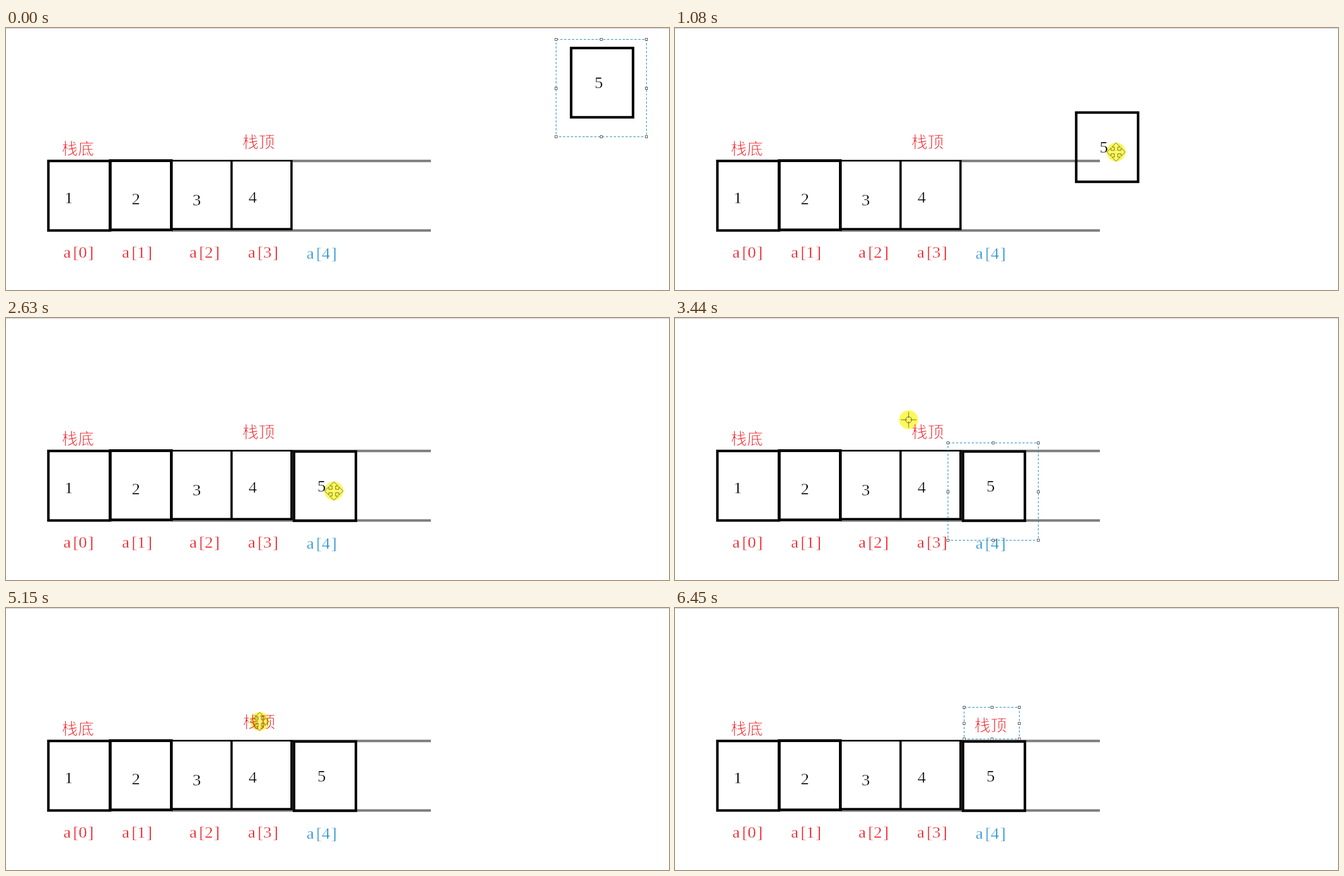
These frames come from a looping animation (1189x471 px, 7.12 s). An HTML page:

```html
<!DOCTYPE html>
<html lang="zh">
<head>
<meta charset="utf-8">
<title>Stack push</title>
<style>
html, body { margin: 0; width: 100%; height: 100%; overflow: hidden; background: #fff; }
svg { display: block; }
/* The white outline thins the letters. */
text { stroke: #fff; stroke-width: .45; }
.serif { font: 30px "Liberation Serif", "Noto Serif", serif; }
.cjk { font: 100 29px "Noto Sans CJK SC", "Noto Sans CJK", sans-serif; stroke-width: .9; }
.red { fill: #ed1c24; }
.blue { fill: #2c93d2; }
.ink { fill: none; stroke: #000; }
.dashed { fill: none; stroke: #000; stroke-dasharray: 4 3; shape-rendering: crispEdges; }
.select { stroke: #1a86cc; }
.handle { fill: #fff; stroke: #555; shape-rendering: crispEdges; }
.pointer { fill: none; stroke: #66662c; stroke-width: 1; }
.halo { fill: #fcf85c; mix-blend-mode: multiply; }
</style>
</head>
<body>
<svg width="1189" height="471" viewBox="0 0 1189 471">
  <path d="M0 .5H1189" stroke="#c3c3c3"/>
  <path d="M514 239H762M298 364H762" stroke="#7f7f7f" stroke-width="4.5"/>
  <g class="ink">
    <path d="M296 238.5H512" stroke-width="3"/>
    <path d="M296 361.5H514M404.5 238V362M512 237V363" stroke-width="4"/>
    <path d="M76 239H186.500V364H76Z" stroke-width="4.5"/>
    <path d="M187 238.500H296.500V363H187Z" stroke-width="5"/>
  </g>
  <g id="labels" class="serif"></g>
  <text class="cjk red" x="100" y="228">栈底</text>
  <text id="topLabel" class="cjk red" x="424" y="215.5">栈顶</text>
  <g id="box">
    <rect class="ink" x="2.5" y="2" width="111" height="124.5" stroke-width="4.5"/>
    <text class="serif" x="44.5" y="73.5">5</text>
  </g>
  <g id="boxSelect"></g>
  <g id="labelSelect"></g>
  <rect id="marquee" class="dashed" x="405.5" y="172.5"/>
  <g id="cursor">
    <circle class="halo" r="17"/>
    <g id="moveIcon" class="pointer"></g>
    <g id="crossIcon" class="pointer">
      <circle r="5.5"/>
      <path d="M-14 0H-3M3 0H14M0 -14V-3M0 3V14"/>
    </g>
  </g>
</svg>
<script>
const LOOP = 7120;
const $ = id => document.getElementById(id);
const add = ([x, y], dx, dy) => [x + dx, y + dy];
const within = (t, from, to) => t >= from && t < to;

// Waypoints are [time, x, y], joined by straight moves.
const boxPath = [[600, 1011, 34], [1080, 717, 150], [1290, 655, 168], [1430, 520, 234], [2630, 514, 238]];
const labelPath = [[5150, 0, 0], [5350, 103, 0], [5700, 113, 6]];
const pointerPath = [
  [260, 1174, 189], [470, 1085, 107],
  [3030, 588, 311], [3440, 419, 183], [3780, 405, 172],
  [4060, 474, 220], [4340, 504, 229], [4540, 504, 229], [4950, 454, 204]
];
const leavePath = [[6240, 567, 210], [6400, 829, 274]];

function follow(path, t) {
  const next = path.findIndex(([time]) => time > t);
  if (next === 0) return path[0].slice(1);
  if (next < 0) return path.at(-1).slice(1);
  const [t0, x0, y0] = path[next - 1], [t1, x1, y1] = path[next];
  const p = (t - t0) / (t1 - t0);
  return [x0 + (x1 - x0) * p, y0 + (y1 - y0) * p];
}

function cursorAt(t, box, label) {
  if (within(t, 470, 3030)) return add(box, 74, 73);
  if (t < 5150) return follow(pointerPath, t);
  if (t < 6240) return add(label, 454, 204);
  return follow(leavePath, t);
}

function selection(w, h) {
  let out = `<rect class="dashed select" x=".5" y=".5" width="${w}" height="${h}"/>`;
  for (const i of [0, 0.5, 1]) for (const j of [0, 0.5, 1]) {
    if (i === 0.5 && j === 0.5) continue;
    const x = Math.round(w * i) - 1.5, y = Math.round(h * j) - 1.5;
    out += `<rect class="handle" x="${x}" y="${y}" width="4" height="4"/>`;
  }
  return out;
}

const place = (id, [x, y]) =>
  $(id).setAttribute("transform", `translate(${Math.round(x)} ${Math.round(y)})`);
const show = (id, on) => $(id).setAttribute("visibility", on ? "visible" : "hidden");

function build() {
  const digits = [[105, 315], [225.5, 317], [334.5, 319], [435, 314]];
  const digitText = digits.map(([x, y], i) => `<text x="${x}" y="${y}">${i + 1}</text>`);
  const indexText = [103, 208, 329, 434, 539].map((x, i) => {
    const [color, y] = i < 4 ? ["red", 413] : ["blue", 415];
    return `<text class="${color}" x="${x}" y="${y}">a<tspan dx="4">[</tspan>${i}<tspan dx="2">]</tspan></text>`;
  });
  $("labels").innerHTML = digitText.concat(indexText).join("");

  $("boxSelect").innerHTML = selection(162, 175);
  $("labelSelect").innerHTML = selection(99, 57);
  $("moveIcon").innerHTML = [0, 90, 180, 270].map(angle =>
    `<path transform="rotate(${angle})" d="M-3 -3V-9H-7.500L0 -16.500L7.500 -9H3V-3"/>`).join("");
}

function draw(t) {
  const box = follow(boxPath, t);
  const label = follow(labelPath, t);
  place("box", box);
  place("topLabel", label);
  place("cursor", cursorAt(t, box, label));
  place("boxSelect", add(box, -25, -14));
  place("labelSelect", add(label, 405, 172));

  // The marquee corner trails slightly behind the pointer.
  const [right, bottom] = follow(pointerPath, t - 20);
  $("marquee").setAttribute("width", Math.max(0, Math.round(right - 405)));
  $("marquee").setAttribute("height", Math.max(0, Math.round(bottom - 172)));

  const visible = within(t, 260, 6445);
  const cross = t < 380 || within(t, 3290, 4600) || t > 6300;
  show("boxSelect", t < 665 || within(t, 3025, 3775));
  show("labelSelect", within(t, 4535, 5145) || t >= 6235);
  show("marquee", within(t, 3800, 4535));
  show("cursor", visible);
  show("moveIcon", visible && !cross);
  show("crossIcon", visible && cross);
}

build();
const began = performance.now();
function tick() {
  draw((performance.now() - began) % LOOP);
  requestAnimationFrame(tick);
}
tick();
</script>
</body>
</html>
```
